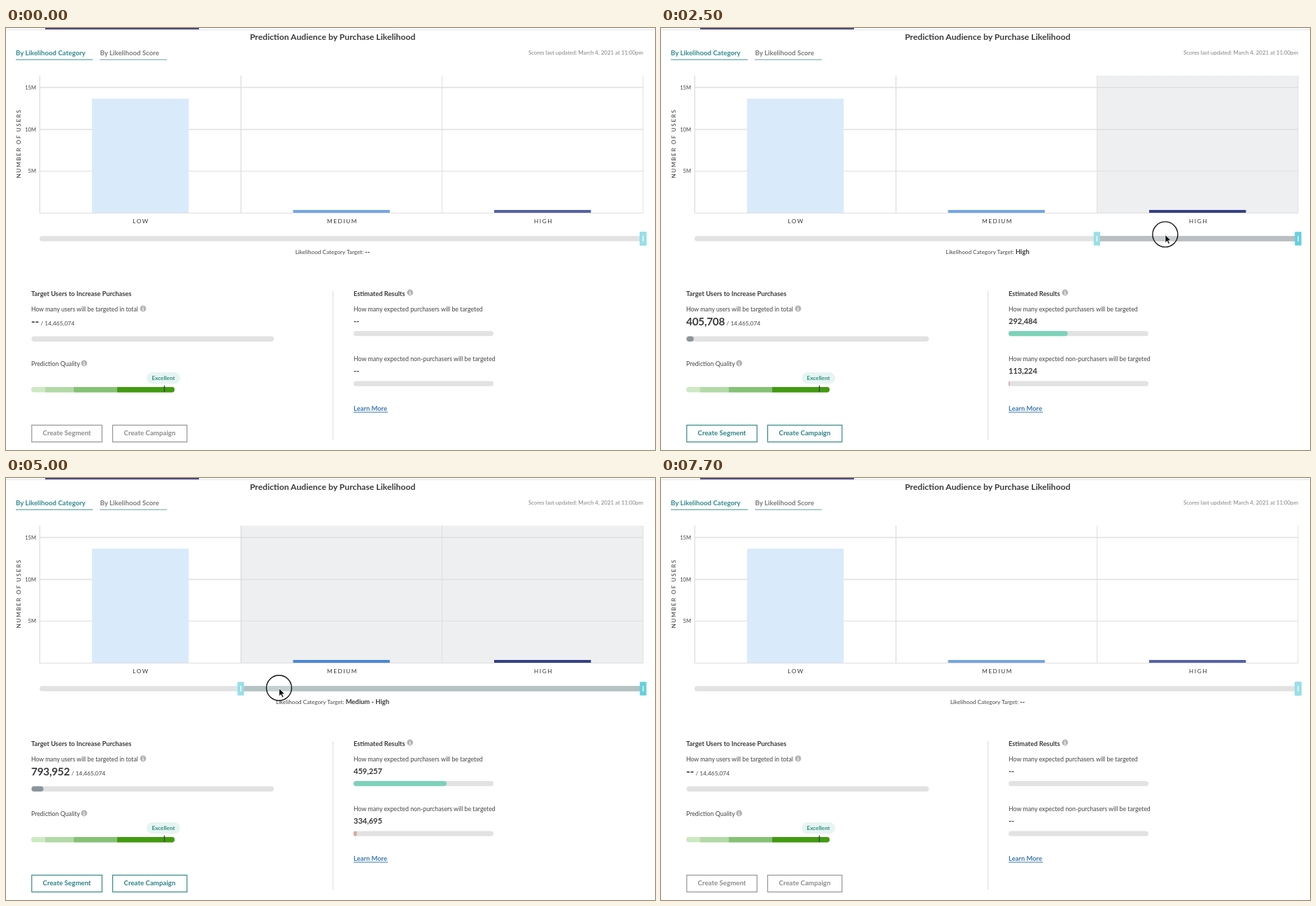
These frames come from a looping animation (928 px wide and 603 px high, 7800 ms). An HTML page:

```html
<!DOCTYPE html>
<html lang="en">
<head>
<meta charset="utf-8">
<title>Prediction audience</title>
<style>
  html, body { margin: 0; width: 100%; height: 100%; overflow: hidden; background: #fff; }
  svg { display: block; width: 100vw; height: 100vh; font-family: Lato, "Open Sans", sans-serif; }
  text { font-size: 8.8px; fill: #444; white-space: pre; }
  .bold { font-weight: 700; fill: #3a3a3d; }
  .mid { text-anchor: middle; }
  .title { font-size: 12.2px; }
  .tab { font-size: 9.7px; font-weight: 700; }
  .axis { font-size: 7.6px; text-anchor: end; }
  .caps { font-size: 8.2px; letter-spacing: 1.6px; text-anchor: middle; fill: #333; }
  .head { font-size: 9.3px; }
  .num { font-size: 11.2px; letter-spacing: -.1px; }
  .big { font-size: 15.4px; letter-spacing: -.3px; }
  .small { font-size: 8.2px; }
  .grid { stroke: #dfdfe0; fill: none; }
  .rail { fill: #e2e2e2; }
  .button rect { fill: #fff; stroke: #949494; stroke-width: 1.2; }
  .button text { font-size: 9.7px; font-weight: 700; text-anchor: middle; fill: #8c8c8c; }
  .active .button rect { stroke: #348789; }
  .active .button text { fill: #2b8083; }
</style>
</head>
<body>
<svg id="stage" viewBox="0 0 928 603">
  <defs>
    <g id="info">
      <circle r="4.4" fill="#b4b4b4"/>
      <path d="M0 -2.6V-1.4M-.9 -.4H.1V2.3M-1.1 2.3H1.2" stroke="#fff" fill="none"/>
    </g>
    <g id="grip">
      <rect x="-4.7" y="-9.8" width="9.4" height="19.6" rx="1"/>
      <path d="M0 -4V4" stroke="#fff" stroke-width="1.2"/>
    </g>
    <clipPath id="pill"><rect x="36" y="513" width="205" height="7.5" rx="3.7"/></clipPath>
  </defs>

  <path d="M0 2.5H928" stroke="#e3e3e7"/>
  <rect x="56" width="220" height="2" fill="#4c4b79"/>
  <text class="title bold mid" x="467" y="17.1">Prediction Audience by Purchase Likelihood</text>
  <text class="tab" x="14" y="39" style="fill:#2f8a8d">By Likelihood Category</text>
  <text class="tab" x="134.5" y="39" style="fill:#7b7b7d">By Likelihood Score</text>
  <path d="M14 45.2H124" stroke="#3d9294"/>
  <path d="M134 45.2H230" stroke="#6ba0a5"/>
  <text x="911" y="38.4" style="font-size:7.9px;text-anchor:end;fill:#808080">Scores last updated: March 4, 2021 at 11:00pm</text>

  <rect id="shade" y="68" height="196" fill="#eeeff1"/>
  <path class="grid" stroke-width="1.4" d="M48 85H911M48 145H911M48.3 68V264M336 68V264"/>
  <path class="grid" d="M48 204.5H911M623.5 68V264M911 68V264"/>
  <rect x="123" y="101" width="138.3" height="163" fill="#d9eafb"/>
  <rect id="medium" x="410.5" y="260" width="138.3" height="4"/>
  <rect id="high" x="698" y="260" width="138.4" height="4"/>
  <path class="grid" d="M48 264.5H911"/>
  <text class="axis" x="43" y="88">15M</text>
  <text class="axis" x="43" y="148">10M</text>
  <text class="axis" x="43" y="207.3">5M</text>
  <text class="caps" transform="translate(20.5 165) rotate(-90)">NUMBER OF USERS</text>
  <text class="caps" x="193" y="278.5">LOW</text>
  <text class="caps" x="481" y="278.5">MEDIUM</text>
  <text class="caps" x="768.5" y="278.5">HIGH</text>

  <rect id="rail" x="48" y="297.2" width="863" height="7.6" rx="3.8"/>
  <rect id="range" y="297.2" height="7.6"/>
  <use href="#grip" x="911" y="301" fill="#66cfdc"/>
  <use id="handle" href="#grip" y="301"/>
  <text class="small mid" x="467" y="322.6">Likelihood Category Target: <tspan id="target" class="bold" font-size="9.4"></tspan></text>

  <path d="M467.5 376V588" stroke="#dcdcdc"/>
  <text class="head bold" x="36" y="382.5">Target Users to Increase Purchases</text>
  <text x="36" y="405" style="font-size:8.7px">How many users will be targeted in total</text>
  <use href="#info" x="196" y="400.8"/>
  <text x="36" y="425"><tspan id="users" class="bold big"></tspan><tspan dx="2.5" font-size="8.4">/ 14,465,074</tspan></text>
  <rect class="rail" x="36.5" y="440.5" width="346.5" height="7.5" rx="3.7"/>
  <rect id="usersBar" x="36.5" y="440.5" height="7.5" rx="3.7" fill="#8b959c"/>

  <text x="36" y="483.3">Prediction Quality</text>
  <use href="#info" x="111.7" y="479"/>
  <rect x="201" y="492" width="48" height="16.5" rx="8.2" fill="#e7f5f2"/>
  <text class="small mid" x="225" y="503" style="font-weight:700;fill:#2d8d7f">Excellent</text>
  <g clip-path="url(#pill)">
    <rect x="36" y="513" width="205" height="8" fill="#cde9c4"/>
    <rect x="56" y="513" width="185" height="8" fill="#b2d9a6"/>
    <rect x="97" y="513" width="144" height="8" fill="#85c274"/>
    <rect x="159" y="513" width="82" height="8" fill="#439a12"/>
  </g>
  <path d="M226.5 510.8V520" stroke="#2d4a36" stroke-width="1.4"/>
  <g class="button">
    <rect x="36.8" y="567.5" width="100.5" height="24"/>
    <text x="87" y="582.4">Create Segment</text>
  </g>
  <g class="button">
    <rect x="152.5" y="567.5" width="106.3" height="24"/>
    <text x="205.5" y="582.4">Create Campaign</text>
  </g>

  <text class="head bold" x="497" y="382.5">Estimated Results</text>
  <use href="#info" x="577.7" y="378"/>
  <text x="497" y="405">How many expected purchasers will be targeted</text>
  <text id="buyers" class="num bold" x="497" y="423.3"></text>
  <rect class="rail" x="497" y="433" width="200" height="7.2" rx="3.6"/>
  <rect id="buyersBar" x="497" y="433" height="7.2" rx="3.6" fill="#7dd1ba"/>
  <text x="497" y="476">How many expected non-purchasers will be targeted</text>
  <text id="others" class="num bold" x="497" y="494.3"></text>
  <rect class="rail" x="497" y="504.6" width="200" height="7.2" rx="3.6"/>
  <rect id="othersBar" x="497" y="504.6" height="7.2" rx="3.6" fill="#d9a5a1"/>
  <text class="tab" x="497" y="547.3" style="font-size:9.4px;fill:#3b79b2">Learn More</text>
  <path d="M497 549H546" stroke="#3b79b2"/>

  <g id="pointer">
    <circle id="ring" cy="-.5" fill="#fff" fill-opacity=".2" stroke="#151515" stroke-width="1.4"/>
    <path id="arrow" d="M0 0V11.4L2.7 9L4.6 13.2L6.6 12.3L4.7 8.3H8.3Z" fill="#111" stroke="#fff" stroke-width=".8"/>
    <g id="open" fill="#fff" stroke="#222" stroke-width="1.1" stroke-linejoin="round">
      <path d="M-3 6.5L-5.8 1.5Q-6 -.3 -4.2 .4L-3.2 1.6L-4.6 -4Q-4 -5.8 -2.8 -4.4L-1.6 -1L-1.8 -5.8Q-.6 -7.4 .3 -5.8L.8 -1.2L1.9 -5.4Q3.2 -6.6 3.8 -5L3.1 -.6L4.6 -3Q6.3 -3.4 6 -1.8L4.2 4L3.2 6.5Z"/>
    </g>
    <g id="fist" fill="#fff" stroke="#222" stroke-width="1.1" stroke-linejoin="round">
      <path d="M-2.6 6L-5 2.7Q-5.6 .3 -3.7 .5L-3.9 -1.8Q-2.9 -3.4 -1.7 -2.3Q-.6 -4 .6 -2.6Q1.9 -3.6 2.8 -2.2Q4.8 -2.6 5 -.4L4.2 3.6L3.2 6Z"/>
      <path d="M-1.2 .6V2.8M.8 .6V2.8M2.7 .6V2.8" stroke-width=".8"/>
    </g>
  </g>
</svg>
<script>
const LOOP = 7800, STEP = 100, PRESS = 1600, RELEASE = 6400;
const LEFT = 48, RIGHT = 911, BAND = (RIGHT - LEFT) / 3, RAIL_Y = 301;

// Pointer path: time, x, y
const path = [
  [1150, 945, 318], [1500, 903, 303], [1700, 901, 302],
  [2200, 735, 296], [2400, 735, 296], [3000, 503, 288],
  [3700, 392, 298], [3900, 392, 298], [4400, 353, 301],
  [4800, 362, 301], [5800, 699, 296], [6300, 912, 299],
  [6500, 914, 299], [6700, 914, 299], [7200, 945, 310]
];

// Results per lower bound of the range; widths are in pixels
const none = { target: "--", users: "--", buyers: "--", others: "--", bars: [0, 0, 0] };
const results = [
  none,
  { target: "Medium - High", users: "793,952", buyers: "459,257", others: "334,695", bars: [17, 133, 4.6] },
  { target: "High", users: "405,708", buyers: "292,484", others: "113,224", bars: [10.3, 84.5, 1.6] },
  none
];

const el = {};
document.querySelectorAll("[id]").forEach(node => el[node.id] = node);

function set(node, attrs) {
  for (const name in attrs) node.setAttribute(name, attrs[name]);
}

function show(node, visible) {
  node.style.display = visible ? "" : "none";
}

function slope(i, axis) {
  if (!path[i - 1] || !path[i + 1]) return 0;
  const rate = j => (path[j + 1][axis] - path[j][axis]) / (path[j + 1][0] - path[j][0]);
  const a = rate(i - 1), b = rate(i);
  return a * b <= 0 ? 0 : 2 * a * b / (a + b);
}

// Monotone cubic through the path points
function along(time, axis) {
  const last = path.length - 1;
  if (time <= path[0][0]) return path[0][axis];
  if (time >= path[last][0]) return path[last][axis];
  const i = path.findIndex(p => p[0] > time) - 1;
  const span = path[i + 1][0] - path[i][0], u = (time - path[i][0]) / span, v = 1 - u;
  return v * v * (1 + 2 * u) * path[i][axis] + u * u * (3 - 2 * u) * path[i + 1][axis]
    + span * u * v * (v * slope(i, axis) - u * slope(i + 1, axis));
}

function draw(time) {
  const x = along(time, 1), y = along(time, 2);
  const pressed = time >= PRESS && time < RELEASE;
  const band = !pressed || x >= 900 ? 3 : Math.floor((x - LEFT) / BAND);
  const edge = LEFT + band * BAND, chosen = band < 3;
  const onHandle = Math.abs(x - edge) < 12 && Math.abs(y - RAIL_Y) < 12;
  const onRail = time > PRESS + 200 && x < 920 && Math.abs(y - RAIL_Y) < 4;
  const result = results[band];

  set(el.shade, { x: edge, width: RIGHT - edge });
  set(el.range, { x: edge, width: RIGHT - edge, fill: onRail ? "#b4c2c4" : "#b8bec1" });
  set(el.rail, { fill: onRail && !chosen ? "#dde1e5" : "#e2e2e2" });
  set(el.handle, { x: edge, fill: onHandle ? "#66cfdc" : "#9adfe8" });
  set(el.medium, { fill: band < 2 ? "#4a87d8" : "#73a5e5" });
  set(el.high, { fill: chosen ? "#353f85" : "#5560a9" });
  set(el.stage, { class: chosen ? "active" : "" });

  for (const key of ["target", "users", "buyers", "others"]) el[key].textContent = result[key];
  ["usersBar", "buyersBar", "othersBar"].forEach((id, i) => set(el[id], { width: result.bars[i] }));

  set(el.pointer, { transform: `translate(${x} ${y})` });
  set(el.ring, { r: 18 + 8 * Math.min(1, Math.max(0, (1900 - time) / 200)) });
  show(el.pointer, x < 944);
  show(el.ring, pressed);
  show(el.arrow, !onHandle);
  show(el.open, onHandle && !pressed);
  show(el.fist, onHandle && pressed);
}

const start = performance.now();
function tick() {
  const time = (performance.now() - start) % LOOP;
  draw(Math.floor(time / STEP) * STEP);
  requestAnimationFrame(tick);
}
tick();
</script>
</body>
</html>
```
